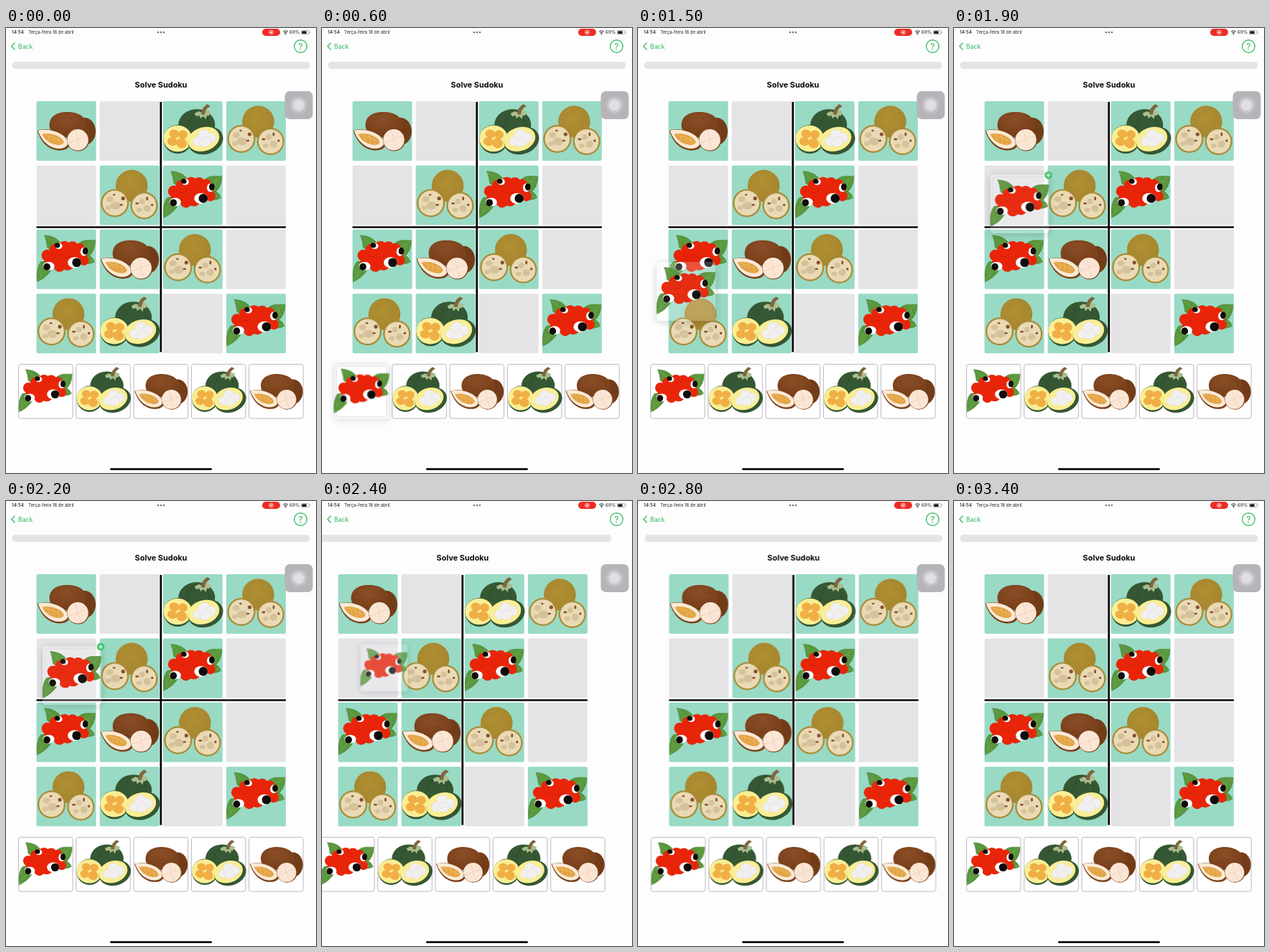
Recreate the animation shown at these times as an HTML page. Size 432 by 620 pixels, loop 3500 ms.

```html
<!DOCTYPE html>
<html lang="en">
<head>
<meta charset="utf-8">
<title>Solve Sudoku</title>
<style>
html, body { margin: 0; width: 100%; height: 100%; overflow: hidden; background: #fefdfe; }
svg { display: block; font-family: Inter, "Liberation Sans", sans-serif; }
#page { animation: shake 3.5s step-end infinite; }
#drag { animation: drag 3.5s step-end infinite; }
#card { animation: card 3.5s step-end infinite; }
#shadow { animation: shadow 3.5s step-end infinite; filter: blur(6px); }
#badge { animation: badge 3.5s step-end infinite; }

@keyframes shake {
  0% { transform: none; }
  65.71% { transform: translateX(-10px); }
  68.57% { transform: translateX(-20px); }
  71.42% { transform: translateX(-8px); }
  74.28% { transform: translateX(3px); }
  77.14% { transform: translateX(4px); }
  80% { transform: translateX(.7px); }
  82.85% { transform: translateX(-.8px); }
  85.71%, 100% { transform: none; }
}
/* stepped segments hold each pose for 100 ms */
@keyframes drag {
  0% { transform: translate(55.2px, 506.4px) scale(.915); opacity: 0; }
  11.42% { transform: translate(55.2px, 506.4px) scale(.915); opacity: 1; animation-timing-function: steps(6); }
  28.57% { transform: translate(55.2px, 506.6px); opacity: 1; }
  34.28% { transform: translate(55.5px, 491px); opacity: 1; animation-timing-function: steps(3); }
  42.85% { transform: translate(67px, 367px); opacity: .96; animation-timing-function: steps(3); }
  51.42% { transform: translate(88px, 256px); opacity: .96; }
  54.28% { transform: translate(91.5px, 245px); opacity: .96; animation-timing-function: steps(3); }
  62.85% { transform: translate(92px, 243px); opacity: .96; }
  65.71% { transform: translate(90px, 238px) scale(.92); opacity: .9; }
  68.57% { transform: translate(86.5px, 232.5px) scale(.8); opacity: .78; }
  71.42% { transform: translate(85px, 232.5px) scale(.72); opacity: .3; }
  74.28%, 100% { transform: translate(84px, 233px) scale(.7); opacity: 0; }
}
@keyframes card {
  0% { opacity: 1; }
  31.42% { opacity: 1; animation-timing-function: steps(4); }
  42.85%, 100% { opacity: .22; }
}
@keyframes shadow {
  0% { opacity: 0; }
  11.42% { opacity: 0; animation-timing-function: steps(6); }
  28.57% { opacity: .34; }
  31.42% { opacity: .34; animation-timing-function: steps(4); }
  42.85%, 100% { opacity: .18; }
}
@keyframes badge {
  0% { opacity: 0; }
  48.57% { opacity: 1; }
  65.71%, 100% { opacity: 0; }
}
</style>
</head>
<body>
<svg width="432" height="620" viewBox="0 0 432 620">
  <defs>
    <radialGradient id="bark" cx=".45" cy=".3" r=".8">
      <stop offset="0" stop-color="#8a4d25"/><stop offset="1" stop-color="#733c18"/>
    </radialGradient>
    <radialGradient id="olive" cx=".45" cy=".4" r=".6">
      <stop offset="0" stop-color="#b18f32"/><stop offset="1" stop-color="#a5862f"/>
    </radialGradient>
    <mask id="outside" maskUnits="userSpaceOnUse" x="-75" y="-75" width="150" height="150">
      <rect x="-75" y="-75" width="150" height="150" fill="#fff"/>
      <rect x="-41" y="-41" width="82" height="82" rx="4"/>
    </mask>

    <!-- every fruit sits in an 83 x 83 box -->
    <g id="cocoa">
      <ellipse cx="67" cy="42" rx="15.500" ry="19" fill="#733c18"/>
      <path d="M18 33C18 19 32 14 46 15C60 16 70 23 70 34C69 45 56 50 42 50C28 50 18 45 18 33Z" fill="url(#bark)"/>
      <path d="M26 24Q40 18 55 21M24 33Q40 28 62 32" fill="none" stroke="#9b5d31" stroke-width=".7" opacity=".5"/>
      <path d="M1 41C13 36 40 41 46 58C47 66 38 70 27 68C12 65 5 53 1 41Z" fill="#7a411b"/>
      <path d="M2 41C14 37 38 42 44.500 57C43 65.500 34 67 26 65.500C13 62 6 52 2 41Z" fill="#fae9d6"/>
      <path d="M8 46C17 43 33 47 38 56C38 61 31 62 25 60C16 58 11 52 8 46Z" fill="#e3a344"/>
      <path d="M11 47Q24 49 36 57M16 46L19 56M23 47L25 59M30 50L31 60" fill="none" stroke="#efbd66" stroke-width=".8"/>
      <circle cx="58" cy="54" r="15.500" fill="#7a411b"/>
      <circle cx="57.500" cy="53.800" r="14.700" fill="#fbe6d5"/>
      <path d="M57 54Q57 46 53 40M57 54Q63 49 71 50M57 54L62 67M57 54L44 58" fill="none" stroke="#edd0ba" stroke-width=".9"/>
    </g>

    <g id="gourd">
      <ellipse cx="47" cy="33" rx="25.500" ry="22" fill="#355733"/>
      <path d="M42 18Q34 28 34 40M59 20Q67 30 64 43" fill="none" stroke="#2f4f2e" stroke-width="1.200"/>
      <path d="M44 17L50 14L55 16L61 12L67 15L64 20L61 20L60 25L56 21L52 24L51 20L46 21Z" fill="#a9bf8e"/>
      <path d="M53 18Q54 8 62 4L66 7Q59 10 58 19Z" fill="#80663f"/>
      <circle cx="20.500" cy="53" r="20" fill="#355733"/>
      <ellipse cx="20.300" cy="52" rx="19.800" ry="18.300" fill="#faee94"/>
      <g fill="#f0af45" transform="rotate(14 20.500 53)">
        <ellipse cx="14" cy="47" rx="7" ry="6"/><ellipse cx="26" cy="45" rx="6.500" ry="6"/>
        <ellipse cx="14" cy="58" rx="7" ry="6"/><ellipse cx="27" cy="57" rx="7.500" ry="7"/>
      </g>
      <g transform="rotate(-18 58 54)">
        <ellipse cx="59" cy="55" rx="25" ry="19" fill="#355733"/>
        <ellipse cx="57" cy="52.500" rx="22.500" ry="16.500" fill="#faee94"/>
        <g fill="#f1eff0" stroke="#dedbdb" stroke-width=".5">
          <ellipse cx="49" cy="53" rx="7.500" ry="6.500"/><ellipse cx="59" cy="46" rx="8" ry="6.500"/>
          <ellipse cx="67" cy="54" rx="7.500" ry="7"/><ellipse cx="58" cy="57" rx="8" ry="6.500"/>
        </g>
      </g>
    </g>

    <g id="round">
      <circle cx="44.500" cy="28.500" r="22.300" fill="url(#olive)"/>
      <g fill="#98781f" opacity=".5">
        <circle cx="38" cy="18" r=".7"/><circle cx="50" cy="23" r=".8"/><circle cx="43" cy="31" r=".7"/><circle cx="56" cy="31" r=".7"/>
      </g>
      <circle cx="21" cy="52.500" r="19.500" fill="#a98a35"/>
      <circle cx="21" cy="52.500" r="17.300" fill="#e9dab5"/>
      <circle cx="61.800" cy="56" r="19" fill="#a98a35"/>
      <circle cx="61.800" cy="56" r="16.800" fill="#e9dab5"/>
      <g fill="#d5c29b">
        <ellipse cx="14" cy="47" rx="5" ry="4"/><ellipse cx="22" cy="56" rx="7" ry="5.500"/><ellipse cx="12" cy="59" rx="4" ry="3"/>
        <ellipse cx="59" cy="50" rx="4" ry="4"/><ellipse cx="66" cy="60" rx="5" ry="5"/><ellipse cx="55" cy="62" rx="4" ry="3"/>
      </g>
      <g fill="#8a5030">
        <circle cx="32.500" cy="46" r="2.600"/><ellipse cx="30" cy="55" rx="2.300" ry="1.300"/><ellipse cx="20" cy="41" rx="1.800" ry="1.200"/>
        <ellipse cx="66" cy="46" rx="1.500" ry="2.700"/>
        <ellipse cx="52" cy="53" rx="2.600" ry="1.400"/><circle cx="73" cy="55" r="1.700"/>
      </g>
    </g>

    <g id="guarana">
      <g fill="#5a973d" stroke="#477f32" stroke-width=".6">
        <path d="M11 8Q31 9 37 25Q24 33 15 25Q14 15 11 8Z"/>
        <path d="M54 29Q57 16 69 15L82 15Q82 31 71 39Z"/>
        <path d="M60 36Q76 32 81 45Q71 51 62 44Z"/>
        <path d="M1 73Q-1 53 6 45L24 42Q24 62 1 73Z"/>
        <path d="M11 8L33 28M82 15L57 32M1 73L20 45M81 45L62 39M74 20L73 28M6 64L5 55" fill="none" stroke="#7cae5b"/>
      </g>
      <g fill="#e92509">
        <circle cx="15" cy="36" r="8"/><circle cx="26" cy="28" r="8"/><circle cx="39" cy="25" r="9"/>
        <circle cx="30" cy="41" r="12"/><circle cx="43" cy="47" r="10"/><circle cx="50" cy="25" r="8.500"/>
        <circle cx="60" cy="26" r="7"/><circle cx="63" cy="33" r="8"/><circle cx="52" cy="37" r="12"/>
        <circle cx="66" cy="43" r="7"/><circle cx="20" cy="44" r="9"/><circle cx="32" cy="51" r="8"/>
        <circle cx="41" cy="36" r="12"/>
      </g>
      <path d="M22 37Q28 40 34 35M38 38Q43 41 48 36" fill="none" stroke="#cb1f0a" stroke-width=".8"/>
      <g fill="#fff">
        <ellipse cx="31" cy="23" rx="5" ry="4.300"/><ellipse cx="17" cy="51" rx="8" ry="6"/>
        <ellipse cx="53" cy="46" rx="9.500" ry="7.500"/><ellipse cx="66" cy="31" rx="4.800" ry="6"/>
      </g>
      <g fill="#100b0b">
        <ellipse cx="29" cy="22" rx="3.800" ry="3.500"/><ellipse cx="14.500" cy="52" rx="4.800" ry="5"/>
        <circle cx="56" cy="46" r="6.300"/><ellipse cx="68" cy="30" rx="3.800" ry="5"/>
      </g>
    </g>
  </defs>

  <rect width="432" height="620" fill="#fefdfe"/>

  <g id="page">
    <rect x="8.500" y="47" width="415" height="10" rx="5" fill="#e4e3e6"/>
    <text x="216" y="83.300" font-size="10.900" font-weight="700" text-anchor="middle" fill="#0c0c0c">Solve Sudoku</text>
    <g id="board"></g>
    <path d="M215.800 103V451.500" stroke="#080808" stroke-width="2.800"/>
    <path d="M42.500 277.500H390" stroke="#080808" stroke-width="2.500"/>
    <g id="tray"></g>
  </g>

  <g id="drag">
    <g mask="url(#outside)">
      <rect id="shadow" x="-41" y="-39" width="82" height="82" rx="4"/>
    </g>
    <g id="card">
      <rect x="-41" y="-41" width="82" height="82" rx="4" fill="#fff" stroke="#d5d2d7" stroke-width=".6"/>
      <rect x="-37.500" y="-37.500" width="75" height="75" rx="3" fill="none" stroke="#cbc8ce" stroke-width=".8"/>
    </g>
    <use href="#guarana" x="-41.500" y="-41.500"/>
    <g id="badge">
      <circle cx="40" cy="-40" r="5.300" fill="#40c265"/>
      <path d="M37 -40H43M40 -43V-37" stroke="#fff" stroke-width="1.200"/>
    </g>
  </g>

  <g font-size="6.400" fill="#222">
    <text x="8" y="8.300" font-weight="500">14:54</text>
    <text x="31" y="8.300" font-size="6.150">Terça-feira 18 de abril</text>
    <text x="395" y="8.300">69%</text>
  </g>
  <g fill="#777"><circle cx="212" cy="6" r="1.300"/><circle cx="216" cy="6" r="1.300"/><circle cx="220" cy="6" r="1.300"/></g>
  <rect x="357" y="1" width="25" height="10" rx="5" fill="#ec2d25"/>
  <circle cx="369.500" cy="6" r="2.800" fill="none" stroke="#fff" stroke-width=".8"/>
  <circle cx="369.500" cy="6" r="1.300" fill="#fff"/>
  <path d="M386.300 5.200Q389.500 2.300 392.700 5.200M387.600 6.800Q389.500 5.200 391.400 6.800" fill="none" stroke="#222" stroke-width="1.100"/>
  <circle cx="389.500" cy="8.300" r=".9" fill="#222"/>
  <rect x="411.400" y="3.400" width="11" height="5.400" rx="1.500" fill="none" stroke="#999" stroke-width=".7"/>
  <rect x="412.300" y="4.300" width="6.500" height="3.600" rx=".7" fill="#222"/>
  <path d="M423.400 5.200V7" stroke="#999" stroke-width=".8"/>

  <path d="M12 21L7.800 25.500L12 30" fill="none" stroke="#43c16c" stroke-width="1.500" stroke-linecap="round" stroke-linejoin="round"/>
  <text x="17" y="28.800" font-size="8.600" font-weight="500" fill="#43c16c">Back</text>
  <circle cx="410.500" cy="25.500" r="8.800" fill="none" stroke="#43c16c" stroke-width="1.400"/>
  <text x="410.500" y="29.800" font-size="12" font-weight="500" text-anchor="middle" fill="#43c16c">?</text>

  <rect x="388.500" y="88" width="39" height="39" rx="7" fill="#b6b4b8"/>
  <circle cx="407.700" cy="107.500" r="12.500" fill="#bfbdc1"/>
  <circle cx="407.700" cy="107.500" r="10" fill="#cbc9cd"/>
  <circle cx="407.700" cy="107.500" r="7.500" fill="#e0dee2"/>
  <rect x="145" y="613.300" width="142" height="2.600" rx="1.300" fill="#050505"/>
</svg>
<script>
const fruit = { c: 'cocoa', g: 'gourd', r: 'round', a: 'guarana' };
const use = (key, at) => fruit[key] ? `<use href="#${fruit[key]}" ${at}/>` : '';

board.innerHTML = [...'c.gr.ra.acr.rg.a'].map((key, i) => {
  const x = 42.5 + i % 4 * 88.15, y = 102 + (i >> 2) * 89.4;
  const fill = fruit[key] ? '#98dac4' : '#e4e3e6';
  return `<rect x="${x}" y="${y}" width="83" height="83" rx="2" fill="${fill}"/>` + use(key, `x="${x}" y="${y}"`);
}).join('');

tray.innerHTML = [...'agcgc'].map((key, i) => {
  const x = 17.5 + i * 80.3;
  return `<rect x="${x}" y="468.500" width="75.500" height="75.500" rx="3" fill="#fff" stroke="#b5b0ba" stroke-width=".9"/>`
    + use(key, `transform="translate(${x} 468.500) scale(.91)"`);
}).join('');
</script>
</body>
</html>
```
